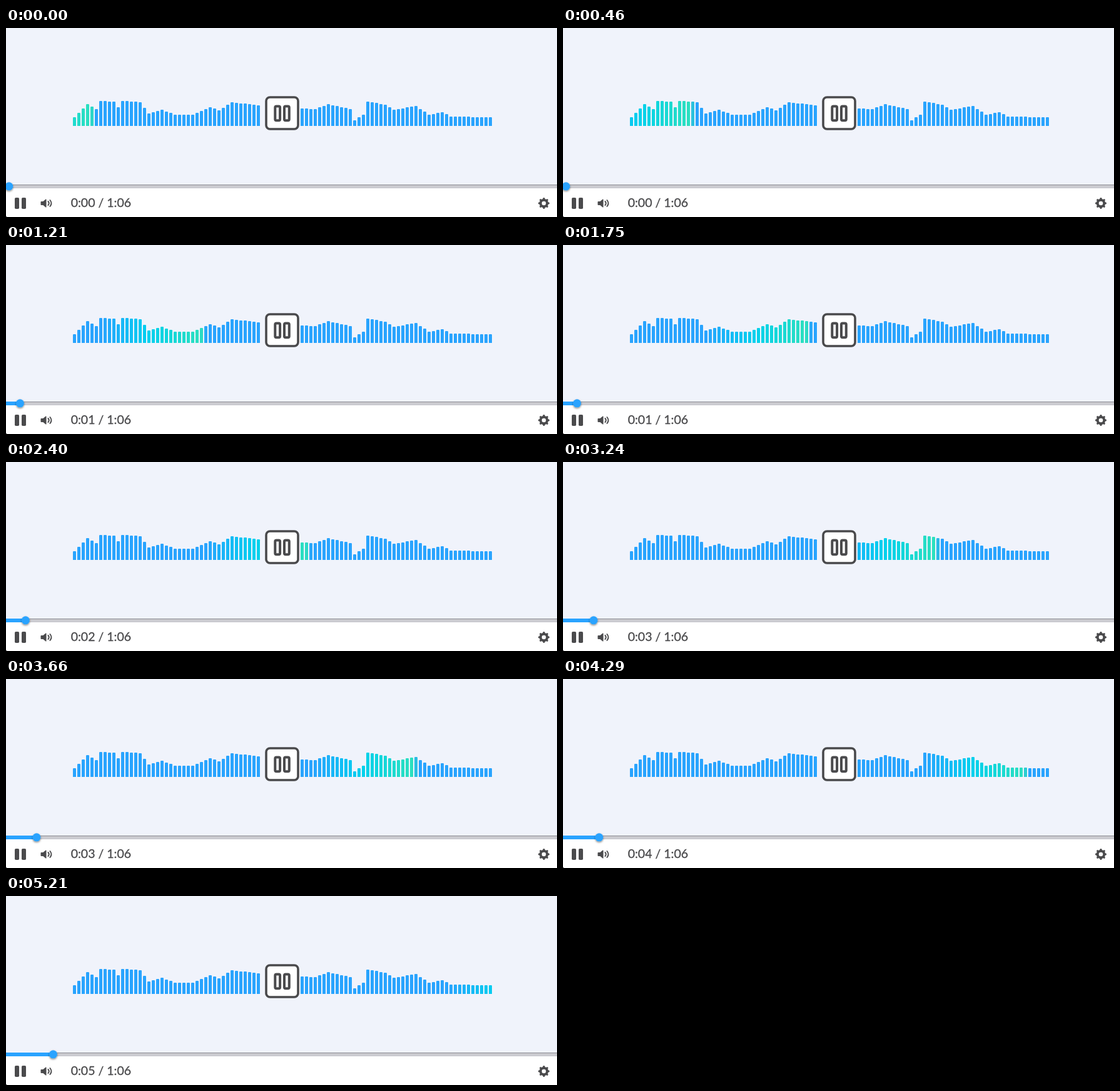
Recreate the animation shown at these times as an HTML page. Size 881x303 px, loop 5310 ms.

```html
<!DOCTYPE html>
<html lang="en">
<head>
<meta charset="utf-8">
<title>Audio player</title>
<style>
  html, body { margin: 0; width: 100%; height: 100%; overflow: hidden; background: #f0f3fb; }
  svg { display: block; width: 881px; height: 303px; }
  text { font: 19.5px Lato, sans-serif; fill: #4a4a4c; stroke: #4a4a4c; stroke-width: .3px; white-space: pre; }
</style>
</head>
<body>
<svg viewBox="0 0 881 303">
  <defs>
    <filter id="shade" x="-60%" y="-60%" width="220%" height="220%">
      <feDropShadow dx="0" dy="1.5" stdDeviation="1.4" flood-color="#000" flood-opacity=".5"/>
    </filter>
  </defs>
  <rect width="881" height="303" fill="#f0f3fb"/>
  <g id="bars"></g>

  <rect x="416" y="111" width="51" height="51" rx="6" fill="#fff" stroke="#4a4a4c" stroke-width="3.6"/>
  <g fill="none" stroke="#4a4a4c" stroke-width="4">
    <rect x="430.3" y="125.5" width="7.8" height="22.8" rx="2"/>
    <rect x="445" y="125.5" width="7.8" height="22.8" rx="2"/>
  </g>

  <rect y="257" width="881" height="46" fill="#fff"/>
  <rect y="251" width="881" height="6" fill="#cbcbd0"/>
  <rect y="251" width="881" height="1" fill="#8d8d92"/>
  <rect id="fill" y="251" height="6" fill="#29a3ff"/>
  <circle id="knob" cy="253.8" r="6.5" fill="#29a3ff" filter="url(#shade)"/>

  <g fill="#4a4a4c">
    <rect x="14" y="272" width="7" height="18" rx="1.8"/>
    <rect x="25" y="272" width="7" height="18" rx="1.8"/>
    <g transform="translate(55.5 272)">
      <path d="M.9 6H3.800L8 2.600q1-.6 1 .5V14.900q0 1.100-1 .5L3.800 12H.9Q0 12 0 11.200V6.800Q0 6 .9 6z"/>
      <path d="M11.900 6q2.700 3 0 6M14.900 4q4.200 5 0 10" fill="none" stroke="#4a4a4c" stroke-width="1.900" stroke-linecap="round"/>
    </g>
    <g id="gear" transform="translate(860 281)"><circle r="9"/></g>
    <path d="M0 301.300V303H1.700z"/>
  </g>
  <text id="clock" x="103.700" y="287"></text>
</svg>
<script>
const LOOP = 5310, BASE = 157, STEP = 7, FIRST = 107, COUNT = 96;
const BLUE = [41, 164, 254], GREEN = [45, 224, 190], CYAN = [2, 208, 238];
// Outline of the waveform as [bar, height]; straight lines join the points
const outline = [[0, 14], [3, 35], [5, 27], [6, 40], [9, 39], [10, 30], [11, 40], [15, 38], [17, 20],
  [20, 26], [23, 18], [27, 18], [31, 30], [33, 25], [36, 38], [42, 33], [55, 27], [58, 35], [63, 27],
  [64, 9], [66, 18], [67, 39], [71, 34], [73, 26], [78, 32], [81, 18], [84, 22], [86, 15], [95, 14]];

const $ = id => document.getElementById(id);
function add(parent, tag, attrs) {
  const el = document.createElementNS('http://www.w3.org/2000/svg', tag);
  for (const k in attrs) el.setAttribute(k, attrs[k]);
  return parent.appendChild(el);
}

function height(i) {
  const n = Math.max(1, outline.findIndex(p => p[0] >= i));
  const [x0, h0] = outline[n - 1], [x1, h1] = outline[n];
  return Math.round(h0 + (h1 - h0) * (i - x0) / (x1 - x0));
}

const bars = [];
for (let index = 0; index < COUNT; index++) {
  if (index > 42 && index < 52) continue; // room for the centre button
  const x = FIRST + STEP * index;
  const d = `M${x} ${BASE}V${BASE - height(index) + 1.2}q0-1.2 1.2-1.2h2.6q1.2 0 1.2 1.2V${BASE}z`;
  bars.push({ index, el: add($('bars'), 'path', { d }) });
}

// Round notches between the teeth, then the hole
for (let a = 22.5; a < 360; a += 45) {
  add($('gear'), 'circle', { cx: 9.28, r: 2.25, fill: '#fff', transform: `rotate(${a})` });
}
add($('gear'), 'circle', { r: 3.3, fill: '#fff' });

const mix = (a, b, k) => `rgb(${a.map((v, i) => Math.round(v + (b[i] - v) * k))})`;

// Age is counted in bars behind the front of the wave
function tint(age) {
  if (age <= 0 || age >= 24) return mix(BLUE, BLUE, 0);
  if (age < 1.2) return mix(BLUE, GREEN, age / 1.2);
  if (age < 13) return mix(GREEN, CYAN, (age - 1.2) / 11.8);
  return mix(CYAN, BLUE, (age - 13) / 11);
}

function draw(t) {
  const front = t / 50 + 5 + 1.1 * Math.max(0, Math.sin(Math.PI * t / 4000));
  for (const b of bars) b.el.setAttribute('fill', tint(front - b.index));

  const ticks = Math.max(0, Math.floor((t - 495) / 665) + 1);
  const x = 4.8 + 8.83 * ticks;
  $('fill').setAttribute('width', x);
  $('knob').setAttribute('cx', x);
  $('clock').textContent = `0:0${Math.floor((t + 180) / 1000)} / 1:06`;
}

const begin = performance.now();
function frame() {
  draw((performance.now() - begin) % LOOP);
  requestAnimationFrame(frame);
}
draw(0);
requestAnimationFrame(frame);
</script>
</body>
</html>
```
